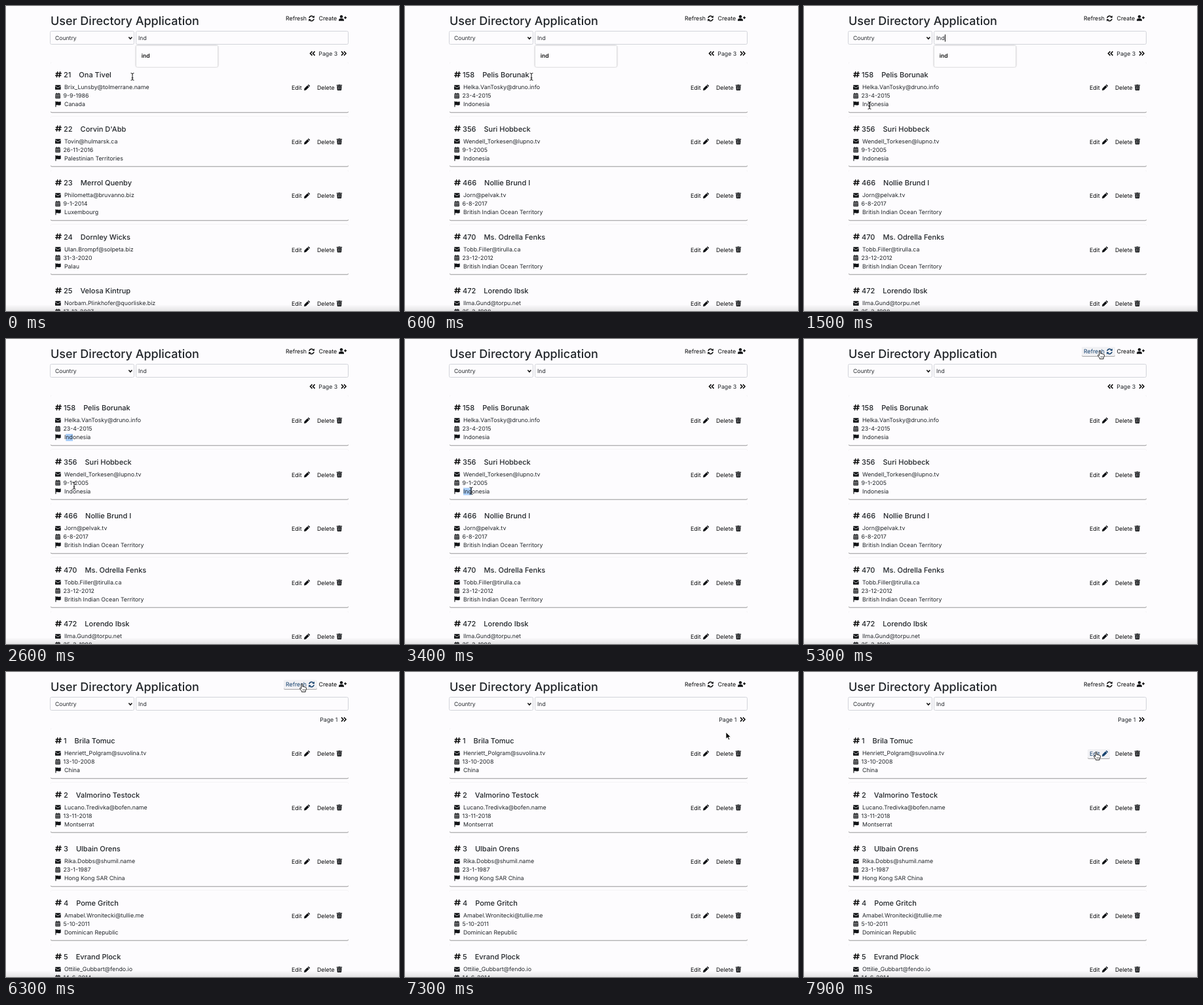
An HTML page for the animation above (8 s loop, 600 by 466 pixels).

```html
<!DOCTYPE html>
<html lang="en">
<head>
<meta charset="utf-8">
<title>User Directory Application</title>
<style>
  html, body { margin: 0; width: 100%; height: 100%; overflow: hidden; background: #fdfcfe; }
  svg { display: block; width: 600px; height: 466px; }
  text { font: 400 8.8px Inter, "Open Sans", sans-serif; fill: #212529; text-rendering: geometricPrecision; white-space: pre; }
  .title { font-size: 18px; font-weight: 500; }
  .head { font-size: 11px; font-weight: 500; }
  .field { font-size: 8.6px; fill: #24282c; }
  .option { font-size: 8.6px; font-weight: 600; fill: #111; }
  .box { fill: #fdfcfe; stroke: #d2d4da; }
  .card { fill: #fdfcfe; filter: drop-shadow(0 0 .5px rgba(0,0,0,.12)) drop-shadow(.7px 1.1px .6px rgba(0,0,0,.38)); }
  .menu { fill: #fefdff; filter: drop-shadow(0 0 .6px rgba(0,0,0,.2)) drop-shadow(0 .8px 1px rgba(0,0,0,.3)); }
  .line { fill: none; stroke: #111; stroke-width: 1.6; }
  .thin { stroke-width: 1; }
  .icon { fill: #111316; fill-rule: evenodd; }
  .button text { fill: #08090a; }
  .button .plate { fill: #f1f1f4; visibility: hidden; filter: drop-shadow(.8px 1px .7px rgba(0,0,0,.35)); }
  .button.hover .plate { visibility: visible; }
  .button.hover text, .button.hover .icon { fill: #17436f; }
  .button.hover .line { stroke: #17436f; }
  .mark { fill: #a8cdf8; }
</style>
</head>
<body>
<svg id="stage" viewBox="0 0 600 466"></svg>
<script>
const LOOP = 8000, STEP = 100, PITCH = 82.5;

const pages = [
  { from: 0, label: 'Page 3', users: [
    [21, 'Ona Tivel', 'Brix_Lunsby@tolmerrane.name', '9-9-1986', 'Canada'],
    [22, "Corvin D'Abb", 'Tovin@hulmarsk.ca', '26-11-2016', 'Palestinian Territories'],
    [23, 'Merrol Quenby', 'Philometta@bruvanno.biz', '9-1-2014', 'Luxembourg'],
    [24, 'Dornley Wicks', 'Ulan.Brompf@solpeta.biz', '31-3-2020', 'Palau'],
    [25, 'Velosa Kintrup', 'Norbam.Plinkhofer@quorliske.biz', '17-12-2007', '']] },
  { from: 500, label: 'Page 3', users: [
    [158, 'Pelis Borunak', 'Helka.VanTosky@druno.info', '23-4-2015', 'Indonesia'],
    [356, 'Suri Hobbeck', 'Wendell_Torkesen@lupno.tv', '9-1-2005', 'Indonesia'],
    [466, 'Nollie Brund I', 'Jorn@pelvak.tv', '6-8-2017', 'British Indian Ocean Territory'],
    [470, 'Ms. Odrella Fenks', 'Tobb.Filler@tirulla.ca', '23-12-2012', 'British Indian Ocean Territory'],
    [472, 'Lorendo Ibsk', 'Ilma.Gund@torpu.net', '25-3-1998', '']] },
  { from: 6200, label: 'Page 1', users: [
    [1, 'Brila Tomuc', 'Henriett_Polgram@suvolina.tv', '13-10-2008', 'China'],
    [2, 'Valmorino Testock', 'Lucano.Tredivka@bofen.name', '13-11-2018', 'Montserrat'],
    [3, 'Ulbain Orens', 'Rika.Dobbs@shumil.name', '23-1-1987', 'Hong Kong SAR China'],
    [4, 'Pome Gritch', 'Amabel.Wronitecki@tullie.me', '5-10-2011', 'Dominican Republic'],
    [5, 'Evrand Plock', 'Ottilie_Gubbart@fendo.io', '14-6-2014', '']] }
];

const shapes = {
  hash: '<path class="line" d="M.7 3H9.9M.1 6.3H9.3M3.8.2L2.3 9.2M7.7.2L6.2 9.2"/>',
  mail: '<path class="icon" d="M.9 0h6.9a.9.9 0 0 1 .9.9L4.35 4 0 .9A.9.9 0 0 1 .9 0zM0 1.8l4.35 3L8.7 1.8v4.3a.9.9 0 0 1-.9.9H.9A.9.9 0 0 1 0 6.1z"/>',
  date: '<path class="icon" d="M1.7 0h1.1v1.1h2V0h1.1v1.1h1a.7.7 0 0 1 .7.7v.7H0v-.7a.7.7 0 0 1 .7-.7h1zM0 3h7.6v4.9a.7.7 0 0 1-.7.7H.7a.7.7 0 0 1-.7-.7z' +
    [1.1, 3.2, 5.3].map(x => `M${x} 3.9h1.1v1.1h-1.1zM${x} 6.1h1.1v1.1h-1.1z`).join('') + '"/>',
  flag: '<path class="icon" d="M.8 0a.8.8 0 0 1 .7.8c2-1 3 .9 7.2-.4v5C5.5 7 4.2 4.9 1.5 6v2.6H.4V1.3A.8.8 0 0 1 .8 0z"/>',
  pencil: '<path class="icon" d="M0 9l.5-3L5.2 1.2l2.6 2.6L3 8.5zM5.7.7l.4-.4a.9.9 0 0 1 1.3 0l1.3 1.3a.9.9 0 0 1 0 1.3l-.4.4z"/>',
  trash: '<path class="icon" d="M0 .6h2.6L3.1 0h2.2l.5.6h2.6v1.2H0zM.6 2.2h7.2l-.4 6a.9.9 0 0 1-.9.8H1.9A.9.9 0 0 1 1 8.2zM2.3 3.5v4.2h.4V3.5zM4 3.5v4.2h.4V3.5zM5.7 3.5v4.2h.4V3.5z"/>',
  reload: '<path class="line" d="M.8 3.8A3.7 3.7 0 0 1 7.4 2.3M8.2 5.2A3.7 3.7 0 0 1 1.6 6.7"/><path class="icon" d="M8.9.1v3.5H5.4zM.1 8.9V5.4h3.5z"/>',
  addUser: '<circle class="icon" cx="4" cy="2.2" r="2.2"/><path class="icon" d="M0 8.8V7.4A2.6 2.6 0 0 1 2.6 4.9h2.8A2.6 2.6 0 0 1 8 7.4v1.4z"/><path class="line" d="M8.2 3.8h3.8M10.1 1.9v3.8"/>',
  prev: '<path class="line" d="M4 .4L1 3.5l3 3.1M8 .4L5 3.5l3 3.1"/>',
  next: '<path class="line" d="M0 .4l3 3.1-3 3.1M4 .4l3 3.1-3 3.1"/>'
};

const cursors = {
  beam: '<path class="line thin" d="M-2.4-5.4Q0-5.4 0-4V4Q0 5.4-2.4 5.4M2.4-5.4Q0-5.4 0-4M0 4Q0 5.4 2.4 5.4M-1.3 1.9H1.3"/>',
  arrow: '<path d="M0 0V10.2L2.4 8 4 11.7 5.7 11 4.2 7.4H7.3z" fill="#000" stroke="#fff" stroke-width=".8"/>',
  hand: '<path d="M-1.1 1C-1.1-.3.9-.3.9 1V4.3Q2.3 3.7 2.9 4.8 4.2 4.3 4.8 5.3 6.5 5 6.5 6.5 6.6 9.4 5.2 10.8V12.4H-.6V11.2Q-2.2 9.4-3.4 7.3C-3.8 6.2-2.5 5.8-1.1 7.4z" fill="#fff" stroke="#111" stroke-width=".9"/><path d="M1.1 8v2.6M2.7 8v2.6M4.2 8v2.6" stroke="#111" stroke-width=".5"/>'
};

// time, x, y, cursor shape
const path = [
  [0, 193, 108, 'beam'], [1000, 193, 108, 'beam'], [1100, 182, 115, 'arrow'], [1300, 125, 142, 'beam'],
  [1500, 100, 152, 'beam'], [1600, 102, 151, 'beam'], [1900, 102, 151, 'beam'], [2200, 93, 151, 'beam'],
  [2300, 93, 153, 'beam'], [2500, 102, 215, 'beam'], [2600, 104, 224, 'beam'], [2700, 108, 230, 'beam'],
  [2900, 92, 232, 'beam'], [3000, 89, 232, 'beam'], [3100, 89, 232, 'beam'], [3400, 101, 232, 'beam'],
  [3600, 101, 232, 'beam'], [3700, 108, 229, 'arrow'], [4000, 255, 160, 'arrow'], [4200, 284, 137, 'arrow'],
  [4600, 284, 137, 'arrow'], [4900, 362, 84, 'arrow'], [5200, 449, 22, 'hand'], [5300, 452, 18, 'hand'],
  [6900, 452, 18, 'hand'], [7000, 460, 30, 'arrow'], [7200, 500, 68, 'arrow'], [7300, 490, 92, 'arrow'],
  [7500, 416, 112, 'arrow'], [7600, 428, 118, 'arrow'], [7700, 444, 121, 'hand'], [7800, 453, 122, 'hand'],
  [7900, 446, 122, 'hand'], [8000, 446, 122, 'hand']
];

// time, left, right, row
const marks = [
  [0, 0, 0, 0], [2000, 96.6, 102, 0], [2100, 91.3, 102, 0], [3000, 0, 0, 0],
  [3200, 89, 91.3, 1], [3300, 89, 96.6, 1], [3400, 89, 102, 1], [3700, 0, 0, 0]
];

const escape = s => String(s).replace(/&/g, '&amp;').replace(/</g, '&lt;');
const text = (x, y, s, cls = '') => `<text x="${x}" y="${y}" class="${cls}">${escape(s)}</text>`;
const icon = (name, x, y) => `<g transform="translate(${x} ${y})">${shapes[name]}</g>`;
const rect = (x, y, w, h, cls) => `<rect x="${x}" y="${y}" width="${w}" height="${h}" rx="2" class="${cls}"/>`;
const button = (label, x, y, w, name, iconX, iconY, id = '') =>
  `<g class="button" id="${id}">${rect(x - 3, y - 10, w, 14, 'plate')}${text(x, y, label)}${icon(name, iconX, iconY)}</g>`;
const rows = draw => [0, 1, 2, 3, 4].map(i => `<g transform="translate(0 ${i * PITCH})">${draw(i)}</g>`).join('');

const userRow = ([id, name, mail, date, country]) =>
  `<text x="88" y="109" class="head">${id}<tspan dx="12">${escape(name)}</tspan></text>` +
  text(89, 127.4, mail) + text(87.5, 140.2, date) + text(89, 153.2, country);

document.getElementById('stage').innerHTML =
  '<defs><linearGradient id="shade" x2="0" y2="1"><stop stop-opacity="0"/><stop offset="1" stop-opacity=".1"/></linearGradient></defs>' +
  text(68, 29, 'User Directory Application', 'title') +
  button('Refresh', 427, 22, 51, 'reload', 462, 14.5, 'refresh') +
  button('Create', 477.5, 22, 46, 'addUser', 508, 14) +
  rect(67.5, 38.5, 128, 20, 'box') + text(75, 52.2, 'Country', 'field') +
  '<path class="line" d="M187.4 47.5l2.5 2.7 2.5-2.7"/>' +
  rect(198.5, 38.5, 324, 20, 'box') + text(202, 52.2, 'Ind', 'field') +
  '<path id="caret" class="line thin" d="M215.5 43.5v11"/>' +
  `<g id="prev">${icon('prev', 463.5, 69)}</g>${icon('next', 512, 69)}` +
  '<text id="page" x="506.3" y="75.7" text-anchor="end"></text>' +
  rows(i => rect(68, 86, 455, 76.3, 'card')) +
  '<rect id="mark" class="mark" height="11"/>' +
  rows(i => icon('hash', 75, 100) + icon('mail', 75, 120.8) + icon('date', 75.3, 132.7) + icon('flag', 75, 145.6) +
    button('Edit', 436, 128, 34, 'pencil', 455, 120, i ? '' : 'edit') +
    button('Delete', 475, 128, 43, 'trash', 504.7, 120)) +
  pages.map(p => `<g class="users">${rows(i => userRow(p.users[i]))}</g>`).join('') +
  `<g id="menu">${rect(198.5, 60.5, 125, 32.5, 'menu')}${text(206.7, 79.2, 'ind', 'option')}</g>` +
  '<rect y="456" width="600" height="10" fill="url(#shade)"/><g id="cursor">' +
  Object.entries(cursors).map(([name, art]) => `<g data-name="${name}">${art}</g>`).join('') + '</g>';

const get = id => document.getElementById(id);
const show = (el, on) => { el.style.display = on ? '' : 'none'; };
const within = (t, a, b) => t >= a && t < b;
const lastIndex = (list, test) => list.reduce((found, item, i) => test(item) ? i : found, 0);
const groups = [...document.querySelectorAll('.users')];
const cursor = get('cursor');

function render(t) {
  const current = lastIndex(pages, p => p.from <= t);
  groups.forEach((g, i) => show(g, i === current));
  get('page').textContent = pages[current].label;
  show(get('prev'), current < 2);
  show(get('caret'), within(t, 1100, 1600));
  show(get('menu'), t < 1800);
  get('refresh').classList.toggle('hover', within(t, 5200, 7000));
  get('edit').classList.toggle('hover', t >= 7700);

  const [, left, right, row] = marks[lastIndex(marks, m => m[0] <= t)];
  const mark = get('mark');
  mark.setAttribute('x', left);
  mark.setAttribute('width', right - left);
  mark.setAttribute('y', 145 + row * PITCH);

  const k = Math.min(lastIndex(path, p => p[0] <= t), path.length - 2);
  const [t0, x0, y0, name] = path[k], [t1, x1, y1] = path[k + 1];
  const f = (t - t0) / (t1 - t0);
  cursor.setAttribute('transform', `translate(${x0 + (x1 - x0) * f} ${y0 + (y1 - y0) * f})`);
  for (const g of cursor.children) show(g, g.dataset.name === name);
}

const start = performance.now();
function tick() {
  const t = (performance.now() - start) % LOOP;
  render(Math.floor(t / STEP) * STEP);
  requestAnimationFrame(tick);
}
tick();
</script>
</body>
</html>
```
